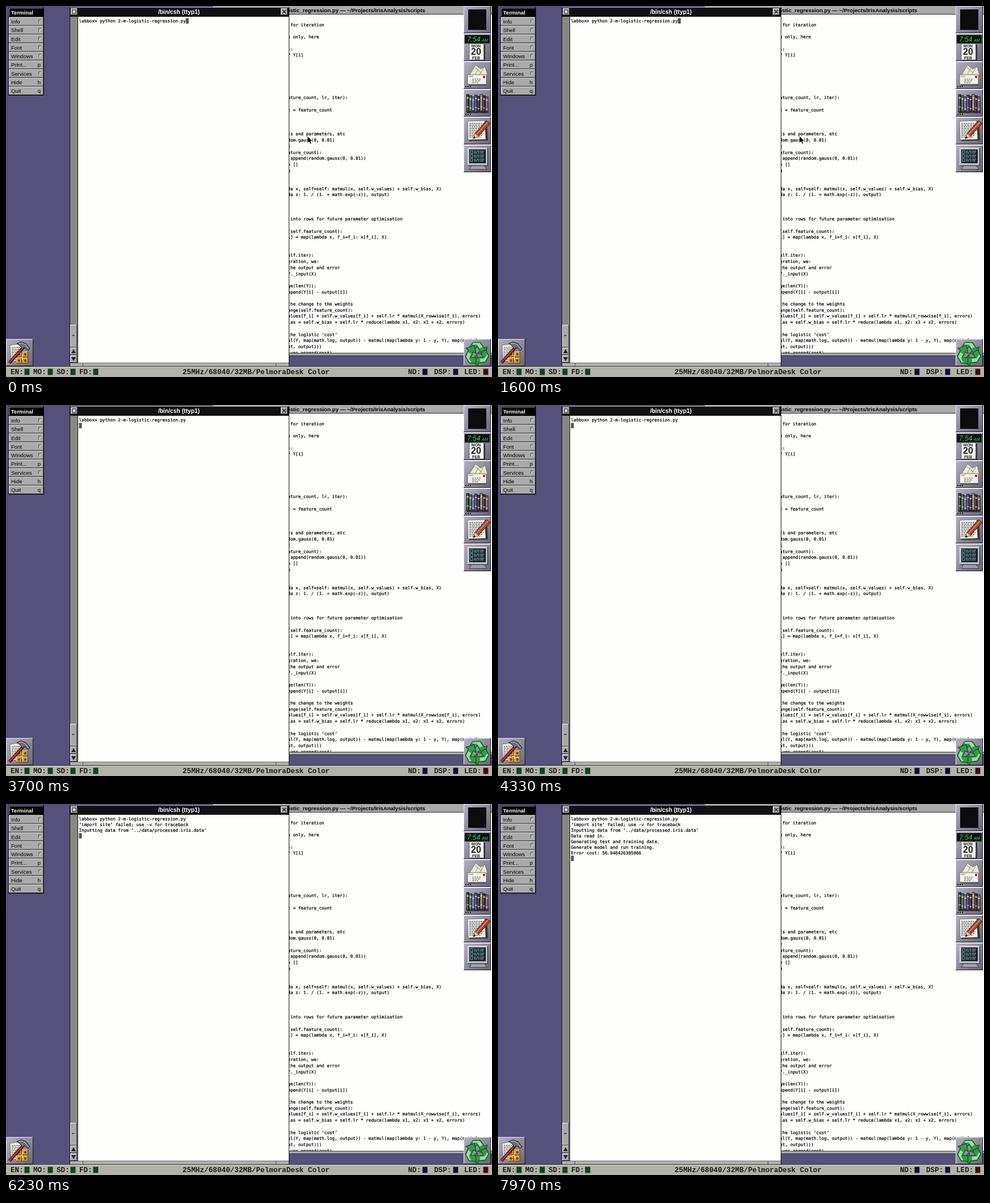
Write an HTML page that moves like this. It is 856x654 px and loops after 8000 ms.

```html
<!DOCTYPE html>
<html lang="en">
<head>
<meta charset="utf-8">
<title>Terminal</title>
<style>
html, body { margin: 0; width: 100%; height: 100%; overflow: hidden; background: #55517b; }
svg { display: block; width: 856px; height: 654px; }
text { white-space: pre; font-family: "Liberation Sans", sans-serif; font-size: 9.5px; }
.code { font-family: "DejaVu Sans Mono", monospace; font-size: 7.63px; stroke: #000; stroke-width: .22px; }
.status { font: bold 12.7px "Liberation Mono", monospace; fill: #1c1c1c; }
.bold { font-weight: bold; }
.lcd { font: italic 12px "Liberation Sans", sans-serif; fill: #30d860; }
</style>
</head>
<body>
<svg id="stage" viewBox="0 0 856 654"></svg>
<script>
const LOOP = 8000, CELL = 4.593;
const stage = document.getElementById('stage');

const rect = (x, y, w, h, fill, more = '') =>
  `<rect x="${x}" y="${y}" width="${w}" height="${h}" fill="${fill}" ${more}/>`;
const path = (d, fill, more = '') => `<path d="${d}" fill="${fill}" ${more}/>`;
const line = (d, stroke, width = 1) => path(d, 'none', `stroke="${stroke}" stroke-width="${width}"`);
const text = (x, y, str, more = '') => `<text x="${x}" y="${y}" ${more}>${str}</text>`;
const group = (x, y, body) => `<g transform="translate(${x} ${y})">${body}</g>`;

// Raised box: light top and left, dark bottom and right
const bevel = (x, y, w, h, fill, light = '#eee', dark = '#333') =>
  rect(x, y, w, h, dark) + rect(x, y, w - 1, h - 1, light) + rect(x + 1, y + 1, w - 2, h - 2, fill);

function menu() {
  const items = ['Info', 'Shell', 'Edit', 'Font', 'Windows', 'Print...p', 'Services', 'Hide h', 'Quit q'];
  let out = rect(4, 2, 63, 156, '#111') + bevel(5, 3, 61, 16, '#000', '#aaa', '#000') +
    text(9, 14.5, 'Terminal', 'class="bold" fill="#fff"');
  items.forEach((item, i) => {
    const y = 19.5 + i * 15.3, key = /^(Print\.\.\.|Hide|Quit) ?(.)$/.exec(item);
    out += bevel(5, y, 61, 14.8, '#aaa', '#e4e4e4', '#444') + text(9, y + 11.4, key ? key[1] : item);
    out += key
      ? text(61, y + 11.4, key[2], 'text-anchor="end"')
      : line(`M57.5 ${y + 10.5}V${y + 4.5}H62`, '#555', 0.9) + line(`M62 ${y + 5}L58 ${y + 10.5}`, '#e4e4e4', 0.9);
  });
  return out;
}

// Row number and the part of the row right of the terminal
const source = `0| for iteration
2|s only, here
4|):
5|* Y[i]
12|ature_count, lr, iter):
14|t = feature_count
18|ts and parameters, etc
19|dom.gauss(0, 0.01)
20|]
21|ature_count):
22|.append(random.gauss(0, 0.01))
23|= []
24|e
27|da x, self=self: matmul(x, self.w_values) + self.w_bias, X)
28|da z: 1. / (1. + math.exp(-z)), output)
32| into rows for future parameter optimisation
34|(self.feature_count):
35|i] = map(lambda x, f_i=f_i: x[f_i], X)
38|elf.iter):
39|eration, we:
40|the output and error
41|f._input(X)
43|ge(len(Y)):
44|ppend(Y[i] - output[i])
46|the change to the weights
47|ange(self.feature_count):
48|alues[f_i] = self.w_values[f_i] + self.lr * matmul(X_rowwise[f_i], errors)
49|ias = self.w_bias + self.lr * reduce(lambda x1, x2: x1 + x2, errors)
51|the logistic ‘cost’
52|ul(Y, map(math.log, output)) - matmul(map(lambda y: 1 - y, Y), map(math.l
53|ut, output)))
54|lues.append(cost)`;

function editor() {
  const rows = source.split('\n').map(row => {
    const [n, str] = row.split('|');
    return text(496.3, 35.8 + n * 10.7, str, 'class="code"');
  }).join('');
  return rect(363, 0, 493, 617, '#222') + rect(364, 0, 492, 14, '#aaa') +
    rect(364, 15, 492, 597, '#fefefd') + rows +
    rect(364, 611.5, 492, 5.5, '#aaa') + rect(364, 611.5, 492, 1, '#444') + rect(364, 616, 492, 1, '#333') +
    text(738.5, 10.5, 'istic_regression.py — ~/Projects/IrisAnalysis/scripts',
      'class="bold" text-anchor="end" style="font-size:9.67px"');
}

function terminal() {
  const scrollBtn = (y, d) => bevel(113, y, 12, 13, '#aaa') + path(d, '#222');
  return rect(112, 2, 387, 633, '#111') + rect(113, 2, 385, 1, '#aaa') +
    bevel(114, 4, 12, 12, '#aaa') + rect(117, 7, 6, 6, '#ddd', 'stroke="#222"') +
    bevel(484, 4, 12, 12, '#aaa') + line('M487 7L493 13M493 7L487 13', '#222', 1.4) +
    text(304.5, 14, '/bin/csh (ttyp1)', 'class="bold" fill="#fff" text-anchor="middle" style="font-size:10.3px"') +
    rect(113, 19, 13, 610, '#888883') + rect(127, 19, 371, 610, '#fefefd') +
    bevel(113, 562, 12, 40, '#aaa') + '<circle cx="118.5" cy="581.5" r="2" fill="#444"/>' +
    path('M117 582a2 2 0 0 0 3.5 0', '#fff') +
    scrollBtn(602, 'M119 605L123 612H115Z') + scrollBtn(616, 'M119 626L123 619H115Z') +
    rect(113, 629, 385, 1, '#333') + rect(113, 630, 385, 5, '#aaa') + rect(113, 630, 385, 1, '#e4e4e4') +
    rect(135, 630, 1, 5, '#555') + rect(475, 630, 1, 5, '#555');
}

const tile = (x, y, body) => group(x, y, bevel(0, 0, 48, 48, 'url(#tile)', '#e6e4ee', '#181820') + body);
const dots = [3, 7, 11].map(x => rect(x, 43, 2, 2, '#111')).join('');
const scribble = (x, y, w, n, color = '#555') => Array.from({ length: n }, (_, i) =>
  `<path d="M${x} ${y + i * 3}h${w - i % 3 * 2}" stroke="${color}" stroke-dasharray="${3 + i % 2} 1"/>`).join('');

function clock() {
  const label = (y, size, str) =>
    text(22, y, str, `class="bold" text-anchor="middle" fill="#222" style="font-size:${size}px"`);
  return rect(2, 2, 44, 15, '#0a1410', 'stroke="#555"') + text(6, 14, '7:54', 'class="lcd"') +
    text(32, 13.5, 'AM', 'class="lcd" style="font-size:7px"') +
    path('M12 19H38V47H13Z', '#333') + path('M10 17.5H35.5V46H10Z', '#f4f4f0', 'stroke="#555" stroke-width=".8"') +
    label(24.3, 7, 'MON') + label(37, 16, '20') + label(44.5, 7, 'FEB');
}

function mail() {
  return path('M10 24L21 6L30 13L38 9L42 24Z', '#e9ecd0', 'stroke="#666" stroke-width=".8"') +
    line('M20 10L32 21M26 12L21 22M35 12L28 23', '#8a9078') +
    path('M8 41H41V42H9Z', '#333') + path('M7 23H40V40H7Z', '#f1f0e6', 'stroke="#555" stroke-width=".8"') +
    rect(34, 25, 4, 4, '#b33') + scribble(15, 31, 16, 3) + line('M9 26h8', '#777') + dots;
}

function books() {
  const spines = ['#24382e', '#3d6a50', '#6f68b8', '#4a3f80', '#26262e', '#a5825a', '#22283c', '#8a5066'];
  return path('M4 38L44 36V42H6Z', '#3a3844') + spines.map((color, i) => {
    const x = 5 + i * 4.8, y = 9 + i * 7 % 5, h = 40 - y - i % 3;
    return rect(x, y, 4.6, h, color, 'stroke="#15151c" stroke-width=".8"') +
      rect(x + 1, y + 2, 1, h - 3, '#ddd', 'opacity=".5"') +
      rect(x + .5, y + 5, 3.6, 2, '#d8c890') + rect(x + .5, y + 21, 3.6, 1.5, '#d8c890');
  }).join('') + dots;
}

function edit() {
  return path('M9 9L41 7L43 41L10 42Z', '#333') + path('M7 7L37 6L39 39L8 40Z', '#f4f3ee', 'stroke="#555" stroke-width=".7"') +
    scribble(10, 11, 25, 9, '#222') + path('M17 38L20 29L40 6L47 11L26 34Z', '#a4482f', 'stroke="#35130c" stroke-width=".9"') +
    line('M23 30L43 8.5', '#e08c68', 1.6) + path('M17 38L20 29L26 34Z', '#e8c89c') + path('M17 38L18.5 33.5L21.5 36Z', '#111');
}

function monitor() {
  let out = path('M14 36H36L41 43H10Z', '#a3a2aa', 'stroke="#222" stroke-width=".8"') +
    bevel(7, 5, 36, 32, '#b6b5bd', '#eee', '#222') + rect(10, 8, 29, 24, '#14222a');
  for (let i = 0; i < 3; i++) {
    const y = 10 + i * 7;
    out += rect(12, y, 4, 5, 'none', 'stroke="#9cc8d0" stroke-width=".8"') +
      line(`M18 ${y + 1}h4m1 0h5m1 0h7M18 ${y + 4}h6m1 0h3m1 0h6`, '#b4d4d8', 1.2);
  }
  return out;
}

function recycler() {
  const arrow = path('M-7 -20H6L13 -10L18 -12L15 3L1 -1L6 -4L0 -13L-5 -5L-14 -10Z', '#2f9e46',
    'stroke="#0f4a20" stroke-width="1.2"') + path('M-7 -19H5L10 -12L5 -9L0 -16H-8Z', '#93e39c');
  return group(23.5, 26, [0, 120, 240].map(a => `<g transform="rotate(${a})">${arrow}</g>`).join(''));
}

function tools() {
  const app = (x, y) => bevel(x, y, 10, 10, '#d89a2c', '#f4cc70', '#60400c') +
    `<circle cx="${x + 5}" cy="${y + 5}" r="2.2" fill="#69501e"/>`;
  return path('M7 11L27 8L30 37L9 40Z', '#eeece4', 'stroke="#555" stroke-width=".7"') + scribble(10, 15, 15, 8, '#444') +
    app(18, 22) + app(29, 22) + app(18, 33) + app(29, 33) +
    line('M6 42L33 12', '#300a0a', 5.5) + line('M6 41.5L33 12', '#b83a34', 2.8) +
    path('M19 8L27 5L35 8L42 17L39 20L32 15L29 19L25 12Z', '#6f6f7a', 'stroke="#15151a"') +
    line('M22 8L28 7L34 10L40 18', '#c4c4cc', 1);
}

function dock() {
  const logo = rect(8, 6, 32, 36, '#0c0c0e');
  return [logo, clock(), mail(), books(), edit(), monitor()]
    .map((body, i) => tile(806, i * 49, body)).join('') +
    tile(806, 587, recycler()) + tile(0, 587, tools());
}

function statusBar() {
  const lamps = [['EN:', 8, 33, '#0b4a14'], ['MO:', 48, 74, '#0b4a14'], ['SD:', 89, 114, '#0b4a14'],
    ['FD:', 129, 154, '#0b4a14'], ['ND:', 708, 734, '#0a0a50'], ['DSP:', 754, 788, '#0a0a50'], ['LED:', 807, 841, '#480808']];
  return rect(0, 635, 856, 19, '#333') + rect(0, 636, 856, 18, '#b3b3a8') + rect(0, 636, 856, 1, '#deded4') +
    lamps.map(([label, x, lx, color]) => text(x, 649, label, 'class="status"') +
      rect(lx, 640, 8, 10, color, 'stroke="#222" stroke-width=".8"')).join('') +
    text(311, 649, '25MHz/68040/32MB/PelmoraDesk Color', 'class="status"');
}

const script = [
  [0, 'labbox> python 2-m-logistic-regression.py'],
  [4900, '‘import site’ failed; use -v for traceback'],
  [6200, 'Inputting data from ‘../data/processed.iris.data’'],
  [7250, 'Data read in.'],
  [7350, 'Generating test and training data.'],
  [7500, 'Generate model and run training.'],
  [7700, 'Error cost: 56.946426385066']
];
const ENTER = 2200;

stage.innerHTML = `<defs><linearGradient id="tile" x1="0" y1="0" x2="1" y2="1">
  <stop offset="0" stop-color="#b2b0bf"/><stop offset="1" stop-color="#696778"/></linearGradient></defs>` +
  rect(0, 0, 856, 654, '#55517b') + menu() + editor() + terminal() +
  script.map((row, i) => text(128.5, 28.8 + i * 9.95, row[1], 'class="code row"')).join('') +
  rect(0, 0, 5, 9.5, '#555', 'id="caret"') + dock() + statusBar() +
  path('M531 229V241.5L533.8 239L536 243.5L538 242.5L536 238.2H539.5Z', '#000',
    'id="pointer" stroke="#fff" stroke-width=".7"');

const rows = stage.querySelectorAll('.row');
const caret = document.getElementById('caret');
const pointer = document.getElementById('pointer');
const show = (el, on) => el.setAttribute('visibility', on ? 'visible' : 'hidden');

function draw(t) {
  const count = script.filter(row => row[0] <= t).length;
  const entered = t >= ENTER;
  rows.forEach((el, i) => show(el, i < count));
  caret.setAttribute('x', entered ? 128.5 : 128.5 + CELL * script[0][1].length);
  caret.setAttribute('y', 21.5 + (entered ? count : 0) * 9.95);
  show(pointer, !entered);
}

const start = performance.now();
function tick(now) {
  draw(Math.max(0, now - start) % LOOP);
  requestAnimationFrame(tick);
}
draw(0);
requestAnimationFrame(tick);
</script>
</body>
</html>
```
